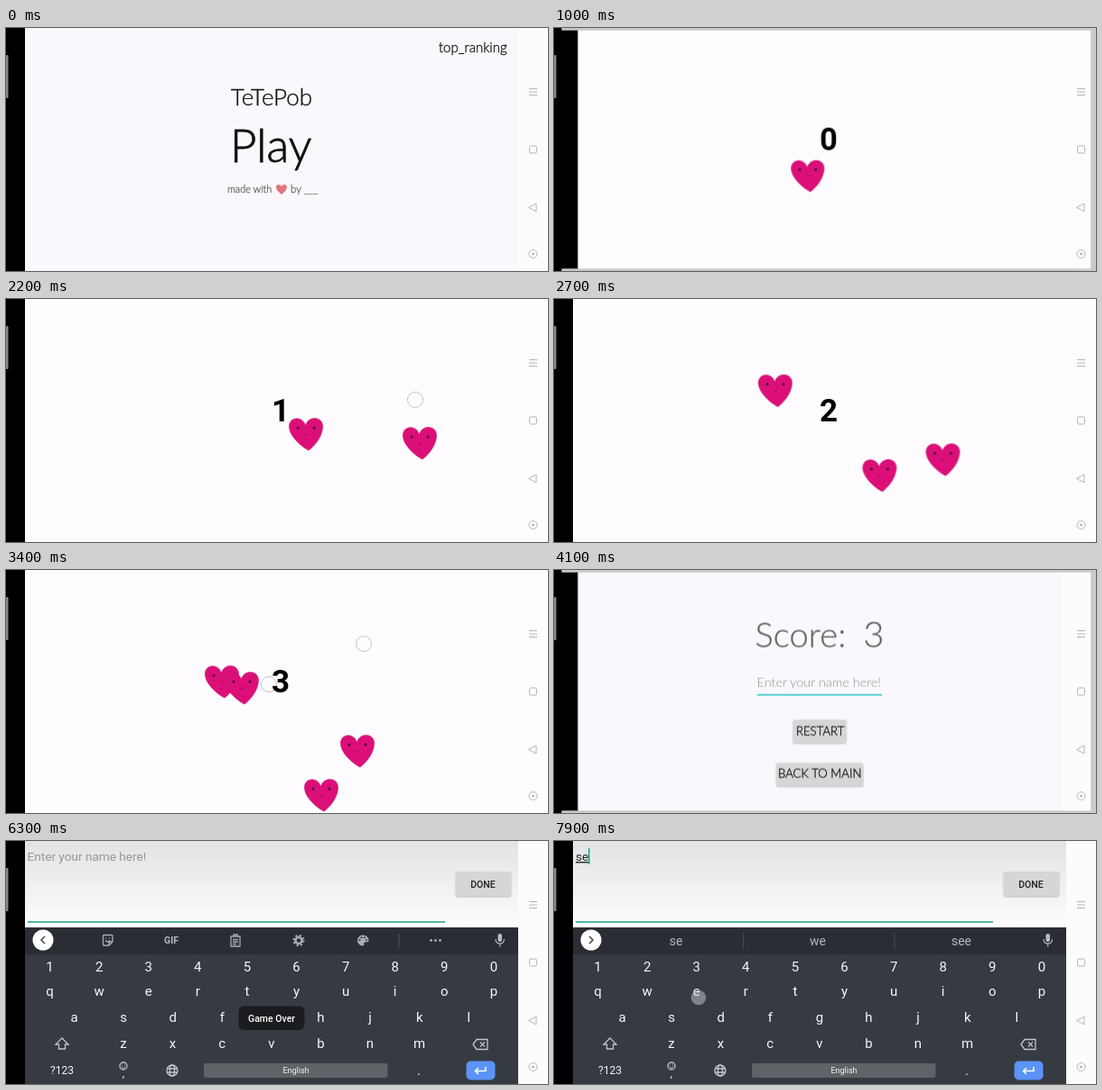
These frames come from a looping animation (600x270 px, 8 s). An HTML page:

```html
<!DOCTYPE html>
<html lang="en">
<head>
<meta charset="utf-8">
<title>Heart game</title>
<style>
  html, body { margin: 0; width: 100%; height: 100%; overflow: hidden; background: #000; }
  svg { display: block; width: 100%; height: 100%; }
  text { font-family: Roboto, sans-serif; }
  .hand text { font-family: Lato, sans-serif; font-weight: 300; fill: #111; stroke: #111; stroke-width: .3; }
  .hand .grey { fill: #666; stroke: #666; }
  .hand .hint { fill: #8d8d8d; stroke: none; }
  .hand .title { stroke-width: .8; }
  .window, .menu { transform-origin: 300px 135px; }
  .score text { font-size: 35px; font-weight: 700; text-anchor: middle; }
  .touch { fill: rgba(255,255,255,.3); stroke: rgba(150,150,155,.55); }
  .touch.dark { fill: rgba(220,222,226,.45); stroke: rgba(140,142,146,.5); }
  .nav, .icons { fill: none; stroke: #b4b4b6; }
  .icons { stroke: #a9adb2; stroke-width: 1.3; }
  .keys text, .words text { fill: #f6f7f9; font-size: 15px; text-anchor: middle; }
  .words text { fill: #b4b8bd; font-size: 14px; }
  .button { fill: #d6d5d7; }
  .typed { font-size: 13.6px; fill: #222; }
  .shadow { filter: drop-shadow(0 1px 1px rgba(0,0,0,.25)); }
</style>
</head>
<body>
<svg viewBox="0 0 600 270" preserveAspectRatio="none">
  <defs>
    <g id="heart">
      <path d="M3 18C-5 14-19 2-18.5-9C-18-20-3-20-.5-9C2-21 19-20 18.5-8C18 2 11 12 3 18Z" fill="#dc0f78" stroke="#c9106c" stroke-width=".7"/>
      <g fill="#3c1238"><circle cx="-9" cy="-7" r="1.5"/><circle cx="9" cy="-7" r="1.5"/></g>
      <path d="M-1.5 0Q0 1.5 1.5 0" fill="none" stroke="#8c0c50"/>
    </g>
    <linearGradient id="sheet" x2="0" y2="1">
      <stop stop-color="#e3e2e4"/><stop offset="1" stop-color="#fefdfe"/>
    </linearGradient>
    <clipPath id="screen"><path d="M21 0H567V270H21Z"/></clipPath>
  </defs>

  <g class="menu hand">
    <path d="M-20-10H21V280H-20Z"/>
    <path d="M21-10H620V280H21Z" fill="#faf8fc"/>
    <path d="M567-10H620V280H567Z" fill="#fdfcfd"/>
    <text x="479" y="27" font-size="15">top_ranking</text>
    <text x="294" y="86" font-size="26" text-anchor="middle">TeTePob</text>
    <text class="title" x="248" y="149" font-size="51">Play</text>
    <text class="grey" x="245" y="183" font-size="11">made with</text>
    <path d="M305 185C297 179 298 174 302 174Q304 174 305 176Q306 174 308 174C312 174 313 179 305 185Z" fill="#e0757a"/>
    <text class="grey" x="315" y="183" font-size="11.5">by ___</text>
    <circle class="touch" cx="296" cy="141" r="8.5" data-show="400 650 80"/>
  </g>
  <rect class="dim" width="600" height="270" opacity="0"/>

  <g class="window" data-open="800">
    <path d="M0 0H21V270H0Z"/>
    <path d="M21 0H600V270H21Z" fill="#fefcfe"/>
    <g class="touches"></g>
    <g class="hearts"></g>
    <g class="score">
      <text x="304" y="136" data-show="0 1700">0</text>
      <text x="304" y="136" data-show="1700 2500">1</text>
      <text x="304" y="136" data-show="2500 3000">2</text>
      <text x="304" y="136" data-show="3000 8000">3</text>
    </g>
  </g>
  <rect class="dim2" width="600" height="270" opacity="0"/>

  <g class="window hand" data-open="3900">
    <path d="M0 0H21V270H0Z"/>
    <path d="M21 0H600V270H21Z" fill="#faf8fc"/>
    <path d="M567 0H600V270H567Z" fill="#fdfcfd"/>
    <text class="grey" x="221" y="85" font-size="39">Score:</text>
    <text class="grey" x="343" y="85" font-size="41">3</text>
    <text class="hint" x="223" y="130" font-size="14.7">Enter your name here!</text>
    <path d="M223.5 138.8H364.5" stroke="#22c2bc" stroke-width="1.5"/>
    <g class="button shadow">
      <rect x="264" y="167" width="60" height="26" rx="2"/>
      <rect x="245" y="216" width="98" height="26" rx="2"/>
    </g>
    <text x="294.5" y="185" font-size="13.5" text-anchor="middle">RESTART</text>
    <text x="294" y="233" font-size="13.5" text-anchor="middle">BACK TO MAIN</text>
    <circle class="touch" cx="296" cy="126" r="8.5" data-show="4800 4980"/>
  </g>

  <g clip-path="url(#screen)">
    <g class="ime">
      <path d="M21 0H567V97H21Z" fill="url(#sheet)"/>
      <path d="M24 90H486" stroke="#1c9f87" stroke-width="1.7"/>
      <rect class="button shadow" x="498" y="34" width="61" height="27" rx="2"/>
      <text x="528" y="52" font-size="10.5" font-weight="500" text-anchor="middle" fill="#222">DONE</text>
      <text x="23.5" y="22" font-size="13.6" fill="#969597" data-show="0 7100">Enter your name here!</text>
      <g class="typed" text-decoration="underline">
        <text x="24" y="22" data-show="7100 7800">s</text>
        <text x="24" y="22" data-show="7800 8000">se</text>
      </g>
      <g fill="#1c9f87">
        <rect x="24" y="8" width="1.5" height="18" data-show="6400 6800"/>
        <rect x="31.5" y="8" width="1.5" height="18" data-show="7100 7600"/>
        <rect x="38" y="8" width="1.5" height="18" data-show="7800 8000"/>
      </g>

      <path d="M21 96H567V270H21Z" fill="#363a41"/>
      <path d="M21 96H567V126H21Z" fill="#2a2e34"/>
      <circle cx="41" cy="110" r="11.5" fill="#fff"/>
      <g data-show="0 7100">
        <path d="M43 106L39 110L43 114" fill="none" stroke="#444" stroke-width="1.5"/>
        <g class="icons">
          <path d="M108.500 104.500H117Q118 104.500 118 105.500V112L114 116H108.500Q107.500 116 107.500 115V105.500Q107.500 104.500 108.500 104.500ZM118 112H114V116M110 110.500Q112.500 113.500 115 110.500M110.500 107.500V108.500M114.500 107.500V108.500"/>
          <path d="M249 106H259V117H249ZM252 106V104H256V106M251 109.500H257M251 112H257M251 114.500H255"/>
          <circle cx="324" cy="110.500" r="3.500" stroke-width="2.500"/>
          <circle cx="324" cy="110.500" r="5.500" stroke-width="2" stroke-dasharray="2.200 2.120"/>
          <path d="M435 103V118" stroke="#484c52"/>
        </g>
        <text x="183" y="114" font-size="10.500" font-weight="700" text-anchor="middle" fill="#b6babf">GIF</text>
        <path d="M395 104.500A6 6 0 1 0 395 116.500Q397 116 396 114Q396 112.500 398 112.500Q401.500 112.500 401.500 110Q401 105 395 104.500Z" fill="#a9adb2"/>
        <g fill="#2a2e34"><circle cx="391.500" cy="110" r="1"/><circle cx="393.500" cy="107.200" r="1"/><circle cx="396.800" cy="107.200" r="1"/><circle cx="398.800" cy="110" r="1"/></g>
        <g fill="#a9adb2"><circle cx="470.500" cy="110.500" r="1.400"/><circle cx="475.500" cy="110.500" r="1.400"/><circle cx="480.500" cy="110.500" r="1.400"/></g>
      </g>
      <g class="words" data-show="7100 8000">
        <path d="M39 106L43 110L39 114" fill="none" stroke="#444" stroke-width="1.500"/>
        <path d="M209.500 102V120M377 102V120" stroke="#484c52"/>
        <g data-show="7100 7800"><text x="135" y="116">s</text><text x="292" y="116">so</text><text x="451" y="116">see</text></g>
        <g data-show="7800 8000"><text x="135" y="116">se</text><text x="292" y="116">we</text><text x="451" y="116">see</text></g>
      </g>
      <rect x="544.500" y="103" width="4.500" height="9" rx="2.200" fill="#b9bcc1"/>
      <path class="icons" d="M542 109Q542 114 546.700 114T551.500 109M546.700 114V117.500"/>

      <g class="keys"></g>
      <g class="icons" style="stroke:#c3c6ca">
        <path d="M62 219L69 226H65.500V231H58.500V226H55Z"/>
        <path d="M517 226L521 220.500H533V231.500H521ZM525 223.500L530 228.500M530 223.500L525 228.500"/>
        <circle cx="130" cy="250" r="4"/>
        <path d="M128 251Q130 254 132 251M128.500 248.500V249.500M131.500 248.500V249.500" stroke-width="1"/>
        <circle cx="184" cy="255" r="6"/>
        <ellipse cx="184" cy="255" rx="2.600" ry="6"/>
        <path d="M178.500 253H189.500M178.500 257H189.500"/>
      </g>
      <rect x="219" y="247" width="203.500" height="16" rx="2" fill="#5f6267"/>
      <rect x="509.500" y="244.500" width="32" height="21" rx="5" fill="#5b93f6"/>
      <path d="M531 251V255.500H519.500M523 252L519.500 255.500L523 259" fill="none" stroke="#fff" stroke-width="1.500"/>
      <g class="keys">
        <text x="62" y="259" style="font-size:12px">?123</text>
        <text x="130" y="262" style="font-size:12px">,</text>
        <text x="321" y="258" style="font-size:9px">English</text>
        <text x="457" y="260">.</text>
      </g>
      <circle class="touch dark" cx="132" cy="200" r="8" data-show="6900 7100"/>
      <circle class="touch dark" cx="160" cy="174" r="8" data-show="7700 8000"/>
    </g>
  </g>

  <g data-show="4150 6350 150">
    <rect x="257.500" y="183.500" width="73" height="26.500" rx="6" fill="#1b1c20"/>
    <text x="294" y="201" font-size="10.500" font-weight="500" text-anchor="middle" fill="#fff">Game Over</text>
  </g>

  <rect x="0" y="30" width="2.500" height="48" rx="1" fill="#8a8a8a"/>
  <g class="nav">
    <path d="M579 67.500H588M579 71H588M579 74.500H588"/>
    <rect x="579.500" y="131" width="8" height="8" rx="1.500"/>
    <path d="M578.500 199.500L587 195V204Z" stroke-linejoin="round"/>
    <circle cx="583.500" cy="251" r="4.500"/>
    <circle cx="583.500" cy="251" r="1" fill="#b4b4b6"/>
  </g>
</svg>
<script>
const LOOP = 8000;
const find = s => document.querySelector(s);

function make(parent, tag, attrs, text = '') {
  const el = document.createElementNS('http://www.w3.org/2000/svg', tag);
  for (const name in attrs) el.setAttribute(name, attrs[name]);
  el.textContent = text;
  return parent.appendChild(el);
}

// Each step is [time in ms, style]; first and last styles are held.
function loop(el, steps) {
  const held = [[0, steps[0][1]], ...steps, [LOOP, steps.at(-1)[1]]];
  el.animate(held.map(([t, style]) => ({ offset: Math.min(t / LOOP, 1), ...style })),
    { duration: LOOP, iterations: Infinity });
}

const fade = (el, points) => loop(el, points.map(([t, opacity]) => [t, { opacity }]));

// Key rows: letters, first x, baseline
for (const [row, x, y] of [['1234567890', 48.5, 145], ['qwertyuiop', 48.5, 172],
  ['asdfghjkl', 75.5, 201], ['zxcvbnm', 130, 230]])
  [...row].forEach((key, i) => make(find('.keys'), 'text', { x: x + i * 54.6, y }, key));

// Hearts: [time, x, y] along each path
const paths = [
  [[800, 300, 190], [1000, 280.5, 165], [1250, 256, 135], [1700, 285, 108], [2200, 332, 150], [2800, 366, 205], [3400, 349, 250], [3900, 325, 296]],
  [[1700, 474, 98], [2200, 458, 160], [2800, 425, 182], [3400, 389, 201], [3900, 362, 226]],
  [[2500, 240, 96], [3000, 252, 110], [3400, 239, 124], [3900, 205, 146]],
  [[3000, 291, 122], [3400, 261, 131], [3900, 222, 150]]
];
for (const path of paths) {
  const heart = make(find('.hearts'), 'use', { href: '#heart', 'data-show': path[0][0] + ' 8000' });
  loop(heart, path.map(([t, x, y]) => [t, { transform: `translate(${x}px, ${y}px)` }]));
}

// Taps during play: x, y, start, end
for (const [cx, cy, from, to] of [[285, 108, 1600, 1780], [453, 112, 2120, 2300], [250, 96, 2450, 2600],
  [291, 122, 2950, 3100], [396, 82, 3320, 3480], [291, 127, 3320, 3480]])
  make(find('.touches'), 'circle', { class: 'touch', cx, cy, r: 8.5, 'data-show': `${from} ${to}` });

for (const el of document.querySelectorAll('[data-show]')) {
  const [from, to, ramp = 0] = el.dataset.show.split(' ').map(Number);
  fade(el, [[from, 0], [from + ramp, 1], [to, 1], [to + ramp, 0]]);
}

// A new window grows into place while the one behind swells and darkens.
for (const el of document.querySelectorAll('[data-open]')) {
  const start = +el.dataset.open;
  const steps = [[0, .88, 0], [100, .945, .8], [200, .98, 1], [300, .994, 1], [400, 1, 1]];
  const frames = steps.map(([t, s, opacity]) => [start + t, { transform: `scale(${s})`, opacity }]);
  if (start < 3900)
    frames.push([3900, { transform: 'scale(1)', opacity: 1 }], [4100, { transform: 'scale(1.045)', opacity: 1 }]);
  loop(el, frames);
}
loop(find('.menu'), [[800, { transform: 'scale(1)' }], [1000, { transform: 'scale(1.045)' }], [1200, { transform: 'scale(1.06)' }]]);
fade(find('.dim'), [[800, 0], [1000, .2], [1200, .2], [1200, 0]]);
fade(find('.dim2'), [[3900, 0], [4100, .2], [4300, .2], [4300, 0]]);

loop(find('.ime'), [
  [5400, { transform: 'translateY(270px)', easing: 'cubic-bezier(.2, .6, .3, 1)' }],
  [5900, { transform: 'translateY(0)' }]
]);
</script>
</body>
</html>
```
